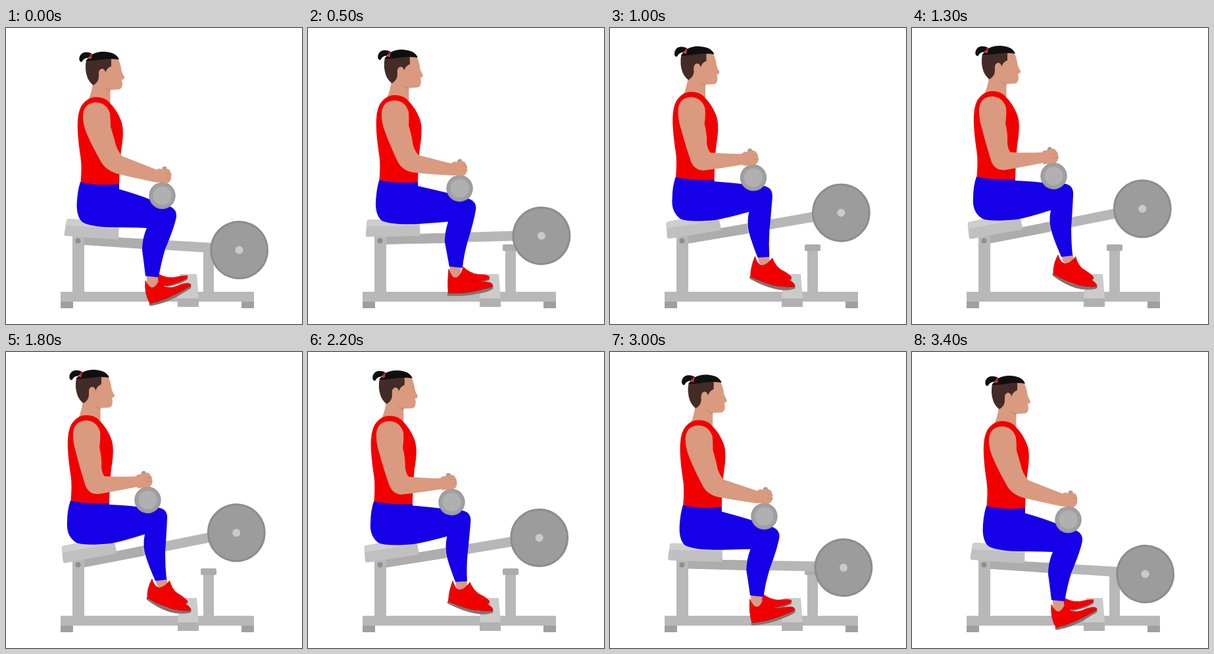
Animation, 450 px wide and 450 px high, one loop 3.5 s. Source, as an HTML page:

```html
<!DOCTYPE html>
<html lang="en">
<head>
<meta charset="utf-8">
<title>Seated calf raise</title>
<style>
  html, body { margin: 0; width: 100%; height: 100%; overflow: hidden; background: #fff; }
  svg { display: block; width: 100vw; height: 100vh; }
  .red { fill: #f20000; }
  .skin { fill: #d99a7f; }
  .sole { fill: none; stroke: #80736f; stroke-width: 5; stroke-linecap: round; }
</style>
</head>
<body>
<svg viewBox="0 0 450 450">
  <!-- frame -->
  <g fill="#b8b8b8">
    <path fill="#9f9f9f" d="M83 415h19v11h-19z M358 415h19v11h-19z"/>
    <path d="M83 401h294v15h-294z M300 336h16v66h-16z"/>
    <rect x="296" y="329" width="24" height="10" rx="2" fill="#acacac"/>
    <path fill="#cbcbcb" d="M264 374H290L293 411H261Z"/>
    <path fill="#b1b1b1" d="M261 411h32v13h-32z"/>
  </g>

  <!-- lever, pivot at its origin -->
  <g id="lever">
    <path fill="#b7b7b7" d="M0 -8L205 -8.5V6.5L0 6Z"/>
    <path fill="#adadad" d="M0 -8L101 -8.3V7L0 6Z"/>
    <circle cx="246" r="44.5" fill="#8d8d8d"/>
    <circle cx="246" r="41.5" fill="#9c9c9c"/>
    <circle cx="246" r="6" fill="#cacaca"/>
  </g>
  <path fill="#b8b8b8" d="M101 314h18v88h-18z"/>
  <circle cx="109.5" cy="323.5" r="4" fill="#8e8e8e"/>
  <g id="seat">
    <path fill="#c0c0c0" d="M-16 -32H58Q61 -31 61 -28L62 -8Q62 -5 59 -5L-18 -6Q-21 -6 -21 -9L-19 -28Q-18 -32 -16 -32Z"/>
    <path fill="#cecece" d="M-16 -32H58Q61 -31 61 -28L62 -21L-20 -22L-17 -31Z"/>
  </g>

  <!-- feet -->
  <path id="backSole" class="sole" style="stroke-width:4"/>
  <path id="backShoe" class="red"/>
  <path id="frontSole" class="sole"/>
  <path id="ankle" fill="none" stroke="#d99a7f" stroke-width="17" stroke-linecap="round"/>
  <path id="frontShoe" class="red" stroke="#c00008" stroke-width=".7"/>

  <!-- torso and head -->
  <g id="body">
    <path class="skin" d="M145 48L170 46Q175 56 175.5 65Q177 70 180 74.5Q180 78 176 79L177 84Q177 93 171 93.5L158.5 94V120L124 112Q131 97 132 82Z"/>
    <path d="M149 88Q153 93 158.5 94V96Q152 94 149 88Z" fill="#c28369"/>
    <path fill="#432b27" d="M122 48Q119 63 124 76Q128 84 133 87Q141 82 141 74Q140 63 146 62Q151 63 151 68Q154 60 160 58V45Z"/>
    <ellipse class="skin" cx="146" cy="69" rx="5" ry="7"/>
    <path fill="#0f0f0f" d="M122 50Q130 35 150 36Q168 37 172 48Q158 46 145 48Q132 50 122 50Z M131 39Q120 34 114 40Q110 45 112 50Q115 54 117 49Q122 43 129 47Z"/>
    <path d="M130 39L127 47" stroke="#d0141c" stroke-width="2.5"/>
    <path class="red" d="M113 240Q116 210 113 194Q108 160 109 142Q110 122 118 114Q126 105 137 105Q150 105 157 113Q169 125 175 141Q180 154 176 180Q173 198 172 242H113Z"/>
  </g>
  <path id="pants" fill="#1500e8"/>
  <path id="arm" class="skin"/>

  <!-- weight and hand, centred on the disc -->
  <g id="weight">
    <path d="M3.5 -41V-10" stroke="#9c9c9c" stroke-width="7" stroke-linecap="round"/>
    <circle r="20.2" fill="#979797"/>
    <circle r="18.6" fill="#a0a0a0"/>
    <circle r="14" fill="#b0b0b0"/>
    <path class="skin" d="M-12 -37Q-6 -43 -1 -40.5Q5 -42 10 -40Q13 -38 13 -35Q15 -32 13.5 -29Q14.5 -25 12 -23Q10 -18 4 -19L-11 -21Z"/>
    <path d="M5 -33H13M5 -27H13" stroke="#c98a70" stroke-width=".8"/>
  </g>
</svg>
<script>
const LOOP = 3500, STEP = 100;
const RISE_END = 1255, FALL_START = 1845, FALL_END = 3400;
const MID = 0.36; // lift amount of the middle pose

// Poses run from lowered to raised, some with a middle one.
const poses = {
  pants: [
    'M113 234Q140 241 172 237L172 245Q200 253 220 261Q240 267 249 271Q260 276 259 287Q256 303 242 336Q236 356 232 379L212 377Q209 352 207 338Q207 320 214 304Q180 303 160 303Q128 302 116 295Q106 286 108 262Q109 247 113 234Z',
    'M108 231Q135 237 167 234L167 240Q198 247 215 251Q236 256 244 259Q256 263 255 275Q252 294 243 323Q237 344 235 364L215 362Q211 340 208 325Q208 309 213 294Q180 297 160 298Q126 299 112 293Q101 283 103 261Q104 244 108 231Z',
    'M98 226Q125 232 157 230L157 232Q185 233 207 236Q226 236 234 237Q246 240 245 254Q244 275 242 305Q242 326 244 346L227 348Q217 325 213 312Q207 295 211 277Q180 287 160 291Q120 295 107 290Q91 280 93 258Q93 240 98 226Z'],
  arm: [
    'M117 135Q117 114 137 113Q153 114 158 130Q159 140 159 150Q164 166 167 178Q171 189 177 195Q205 206 228 215L230 235Q195 228 167 221Q153 216 146 206Q131 180 123 161Q117 147 117 135Z',
    'M102 126Q102 105 122 104Q138 105 143 121Q144 131 142 145Q146 162 145 175Q146 185 150 189Q180 190 198 189L204 204Q165 212 140 216Q127 217 121 204Q111 172 107 155Q102 140 102 126Z'],
  ankle: ['M222 376L223 386', 'M224 361L224 371', 'M236 345L237 350'],
  frontShoe: [
    'M212 384Q222 404 231 387Q244 398 258 393Q270 388 277 388Q282 389 281 392Q262 403 246 410Q232 416 219 419Q210 404 212 384Z',
    'M214 366Q222 389 233 372Q243 384 256 385Q270 386 277 387Q282 390 281 393Q262 399 246 401Q232 403 213 402Q212 386 214 366Z',
    'M222 345Q229 368 246 351Q249 364 258 373Q269 379 277 386Q282 390 281 393Q264 394 250 390Q232 384 215 374Q214 360 222 345Z'],
  frontSole: [
    'M220 420Q242 416 261 405Q272 398 279 394',
    'M214 404Q240 405 258 401Q272 400 279 395',
    'M216 375Q233 388 250 393Q265 397 279 394'],
  backShoe: [
    'M230 372Q240 380 255 379Q268 376 275 376Q278 378 275 381Q262 388 245 392L228 392Z',
    'M236 362Q246 372 258 374Q270 374 275 377Q277 379 275 382Q262 386 245 386L230 380Z',
    'M249 347Q252 360 260 366Q270 372 276 378Q277 380 275 382Q264 382 252 378L232 366Z'],
  backSole: [
    'M274 381Q262 389 245 391',
    'M274 382Q262 387 248 386',
    'M274 381Q266 384 252 379']
};

const $ = id => document.getElementById(id);
const mix = (a, b, p) => a + (b - a) * p;
const ease = x => (1 - Math.cos(Math.PI * Math.min(1, Math.max(0, x)))) / 2;
const numbers = path => path.match(/-?[\d.]+/g).map(Number);

// Parabola through a at 0, m at MID and b at 1.
function curve(a, m, b, p) {
  const bend = (m - mix(a, b, MID)) / (MID * (1 - MID));
  return mix(a, b, p) + bend * p * (1 - p);
}

const parts = Object.entries(poses).map(([id, paths]) =>
  ({ node: $(id), template: paths[0], values: paths.map(numbers) }));

function blend({ template, values }, p) {
  let i = 0;
  return template.replace(/-?[\d.]+/g, () => {
    const v = values.map(list => list[i]);
    i++;
    const n = v.length === 2 ? mix(v[0], v[1], p) : curve(v[0], v[1], v[2], p);
    return n.toFixed(2) + ' ';
  });
}

function place(id, x, y, angle = 0) {
  $(id).setAttribute('transform', `translate(${x} ${y}) rotate(${angle})`);
}

function lift(t) {
  return t < FALL_START
    ? ease(t / RISE_END)
    : 1 - ease((t - FALL_START) / (FALL_END - FALL_START));
}

function draw(t) {
  const p = lift(t);
  const tilt = mix(3.4, -11.3, p);
  place('lever', 109, 323, tilt);
  place('seat', 109, 323, tilt);
  place('body', -15 * p, -9 * p);
  place('weight', curve(237.5, 230.2, 215.5, p), curve(255, 243.3, 225, p), -13.5 * p);
  for (const part of parts) part.node.setAttribute('d', blend(part, p));
}

function tick() {
  const t = performance.now() % LOOP;
  draw(Math.floor(t / STEP) * STEP);
  requestAnimationFrame(tick);
}
tick();
</script>
</body>
</html>
```
